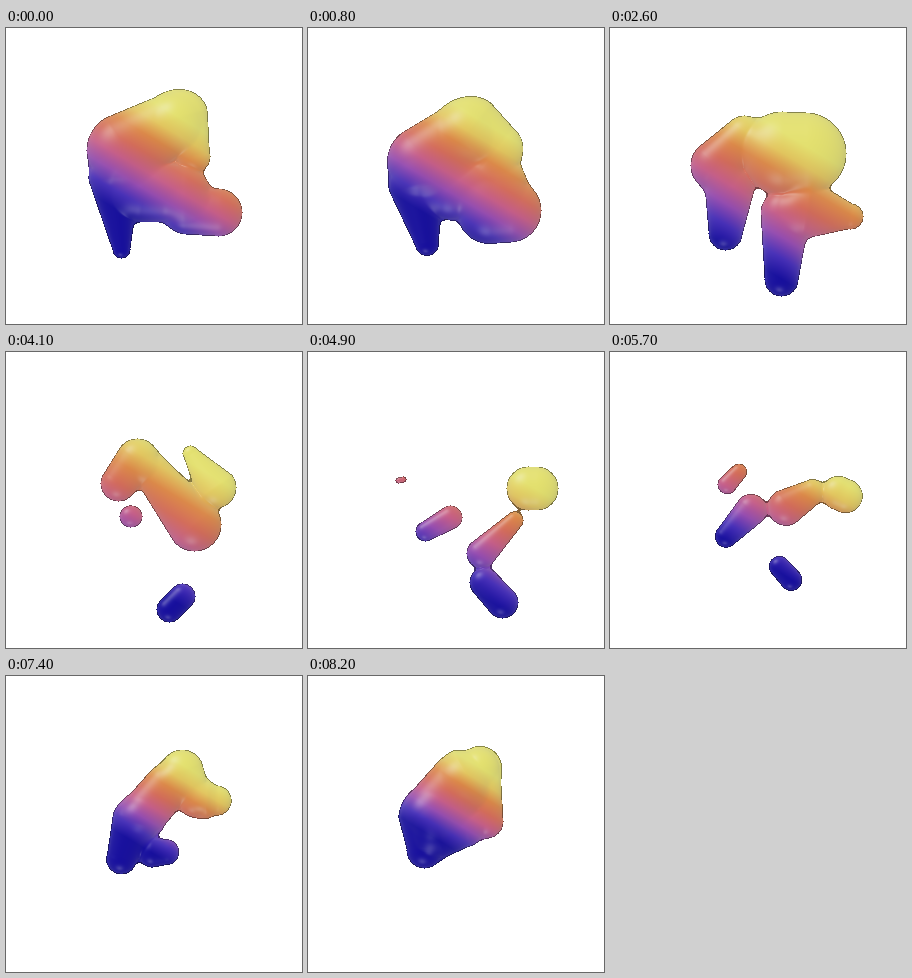
These frames come from a looping animation (296x296 px, 8.3 s). An HTML page with a canvas:

```html
<!DOCTYPE html>
<html>
<head>
<meta charset="utf-8">
<style>
html, body { margin: 0; width: 100%; height: 100%; overflow: hidden; background: #fff; }
canvas { display: block; width: 100%; height: 100%; }
</style>
</head>
<body>
<canvas id="stage" width="296" height="296"></canvas>
<script>
const SIZE = 296, LOOP = 8300, STEP = 100;
const MIN = 50, MAX = 280;
const SMOOTH = 8;
const ctx = document.getElementById('stage').getContext('2d');
const image = ctx.createImageData(SIZE, SIZE);
const pixels = new Uint32Array(image.data.buffer);
const height = new Float32Array(SIZE * SIZE);
const dist = new Float32Array(SIZE * SIZE);

// The body is five tapered limbs that melt together where they meet.
// A pose gives each limb as two balls, "x y r x y r", and the
// positions along the colour axis where yellow starts and blue ends.
const pose = (time, warm, cold, ...limbs) =>
  ({ time, values: [warm, cold, ...limbs.join(' ').split(' ').map(Number)] });

const poses = [
  pose(0, -15, 115, '175 88 27 187 128 17', '118 122 38 165 95 31', '108 150 26 115 221 9', '135 162 32 175 165 29', '180 182 24 212 184 24'),
  pose(1600, -8, 115, '150 112 38 188 113 38', '112 145 35 140 120 36', '108 165 30 122 210 15', '150 160 30 203 147 30', '182 184 41 190 180 40'),
  pose(2600, 0, 148, '172 125 42 195 125 41', '106 137 26 134 108 21', '119 160 25 115 205 17', '175 185 25 171 251 17', '198 181 30 240 188 13'),
  pose(4100, 0, 148, '184 101 8 209 135 21', '112 131 18 131 108 22', '124 164 11 125 164 11', '176 244 13 163 257 13', '147 121 19 188 172 27'),
  pose(4900, 0, 140, '220 136 22 228 136 22', '117 179 10 142 165 12', '90 128 3 95 127 3', '176 230 15 194 250 16', '173 201 15 206 168 9'),
  pose(6700, -22, 92, '238 146 11 244 153 11', '114 190 13 139 148 21', '150 137 18 170 110 15', '160 194 5 164 199 5', '179 97 23 197 104 18'),
  pose(8200, -12, 86, '160 98 28 171 91 20', '116 174 18 118 143 28', '125 135 30 150 110 32', '130 155 27 155 149 22', '172 92 20 178 145 17')
];

const ramp = [[230, 227, 112], [229, 200, 96], [222, 138, 74], [214, 110, 92], [200, 96, 138], [152, 78, 178], [72, 48, 186], [24, 16, 160]];

const mix = (a, b, f) => a + (b - a) * f;
const clamp = (v, lo = 0, hi = 1) => Math.min(hi, Math.max(lo, v));

function poseAt(t) {
  const n = poses.findLastIndex((p, i) => p.time <= t && i < poses.length - 1);
  const a = poses[n], b = poses[n + 1];
  const f = clamp((t - a.time) / (b.time - a.time));
  return a.values.map((v, i) => mix(v, b.values[i], f));
}

function rampColor(level) {
  const v = clamp(level, 0, .9999) * (ramp.length - 1), i = Math.floor(v);
  return ramp[i].map((c, j) => mix(c, ramp[i + 1][j], v - i));
}

// Signed distance (negative inside) and relief height at one pixel.
function sample(x, y, limbs) {
  let d = 99, bulge = 0;
  for (let k = 0; k < limbs.length; k += 6) {
    const dx = limbs[k + 3] - limbs[k], dy = limbs[k + 4] - limbs[k + 1];
    const px = x - limbs[k], py = y - limbs[k + 1];
    const f = clamp((px * dx + py * dy) / (dx * dx + dy * dy + .01));
    const r = mix(limbs[k + 2], limbs[k + 5], f);
    const away = Math.hypot(px - f * dx, py - f * dy), e = away - r;
    const overlap = Math.max(0, SMOOTH - Math.abs(d - e));
    d = Math.min(d, e) - overlap * overlap / (4 * SMOOTH);
    bulge += Math.max(0, r * r - away * away) ** 2;
  }
  const i = y * SIZE + x;
  dist[i] = d;
  height[i] = .7 * bulge ** .25;
}

function eachPixel(visit) {
  for (let y = MIN; y < MAX; y++) for (let x = MIN; x < MAX; x++) visit(x, y);
}

function draw(t) {
  const [warm, cold, ...limbs] = poseAt(t);
  eachPixel((x, y) => sample(x, y, limbs));
  pixels.fill(0xffffffff);
  eachPixel((x, y) => {
    const i = y * SIZE + x;
    if (dist[i] > 0) return;
    const nx = (height[i - 2] - height[i + 2]) / 4;
    const ny = (height[i - 2 * SIZE] - height[i + 2 * SIZE]) / 4;
    const len = Math.hypot(nx, ny, 1);
    const lit = (sx, sy) => Math.max(0, (sx * nx + sy * ny + .87) / len);
    const light = lit(-.3, -.4);
    const white = clamp(.25 * light ** 40 + .2 * lit(-.1, .48) ** 60 + .25 * (1 - 1 / len));
    const shade = (.87 + .13 * light) * (dist[i] > -.8 ? .6 : 1);
    const [r, g, b] = rampColor((y - .6 * x - warm) / (cold - warm))
      .map(c => mix(c, 245, white) * shade);
    pixels[i] = (255 << 24 | b << 16 | g << 8 | r) >>> 0;
  });
  ctx.putImageData(image, 0, 0);
}

let shown = -1;
function tick() {
  const t = Math.floor(performance.now() % LOOP / STEP) * STEP;
  if (t !== shown) draw(shown = t);
  requestAnimationFrame(tick);
}
tick();
</script>
</body>
</html>
```
